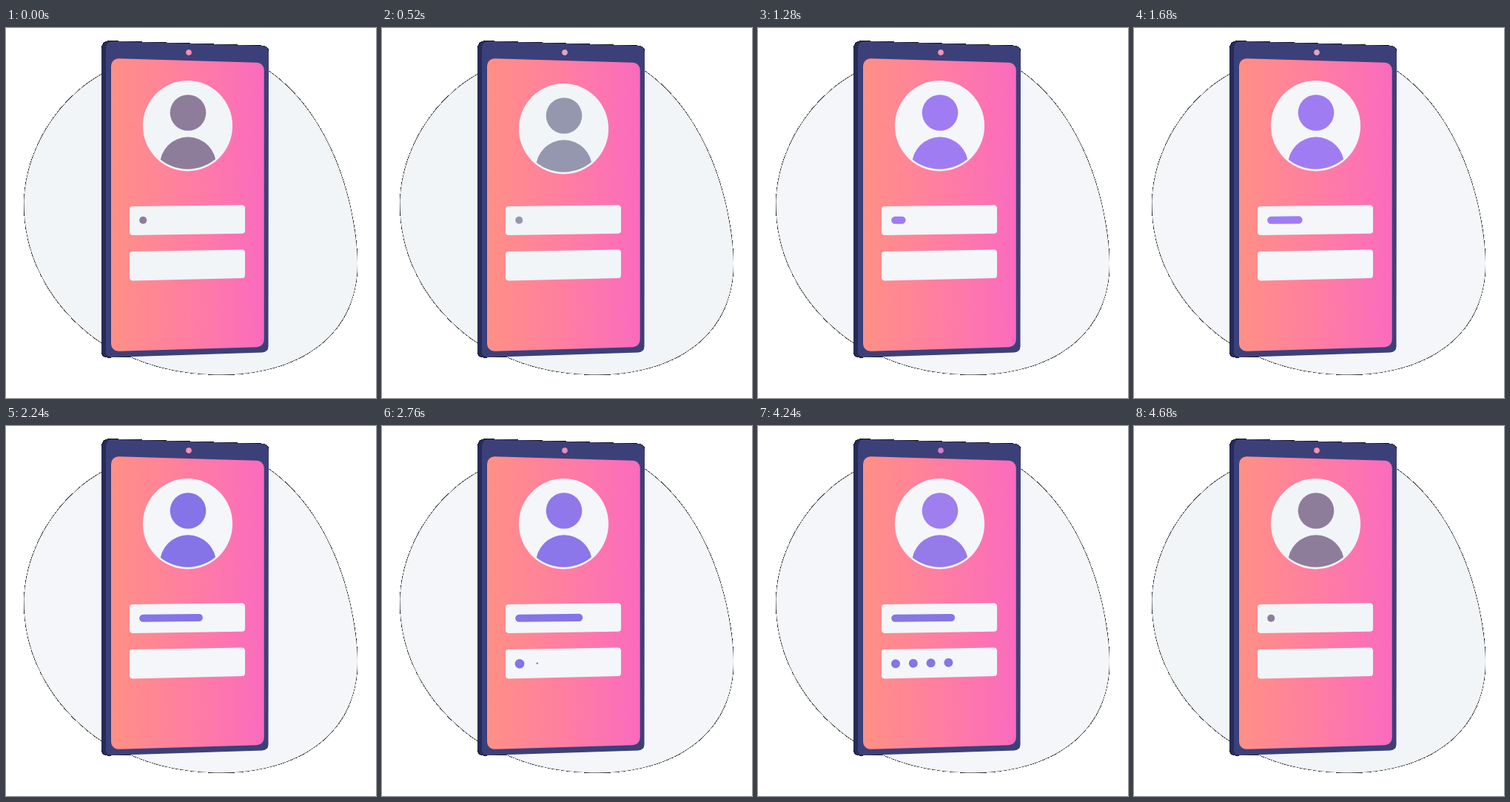
Write an HTML page with a canvas that moves like this. It is 500 by 500 pixels and loops after 4.84 s.

```html
<!DOCTYPE html>
<html lang="en">
<head>
<meta charset="utf-8">
<title>Sign-in phone</title>
<style>
html, body { margin: 0; width: 100%; height: 100%; overflow: hidden; background: #fff; }
canvas { display: block; width: 500px; height: 500px; }
</style>
</head>
<body>
<canvas id="stage" width="500" height="500"></canvas>
<script>
const ctx = document.getElementById('stage').getContext('2d', { willReadFrequently: true });
const LOOP = 4840, STEP = 40;

const blob = new Path2D('M24.5 240 C24.5 170 66 98 130 62 C200 20 300 20 355 58 C410 96 448 165 465 240 C471 268 475 295 475 318 C475 420 390 468.5 292 468.5 C240 468.5 200 458 170 445 C155 439 142 433 130 426 C64 382 24.5 312 24.5 240Z');
const side = new Path2D('M129 28 Q130 17.5 140 17.5 L150 18 L150 444.5 L138 445.3 Q129 445 129 436Z');
const front = new Path2D('M135 28 Q135.5 17.6 145 17.8 L346 24 Q355 24.5 355 33 L354.5 430 Q354.5 438 346 438.5 L144 445 Q135 445.5 135 437Z');

const screenFill = ctx.createLinearGradient(142, 0, 349, 0);
screenFill.addColorStop(0, '#ff9085');
screenFill.addColorStop(0.5, '#ff7ea1');
screenFill.addColorStop(1, '#fa6bbe');

const MAUVE = [142, 124, 155], SLATE = [149, 151, 174];
const VIOLET = [160, 124, 242], INDIGO = [132, 116, 231];
const MIST = [241, 245, 248], SNOW = [244, 246, 250];
const PINK = [255, 143, 179], PALE = [226, 168, 193], ORCHID = [214, 122, 207];

const clamp = v => Math.max(0, Math.min(1, v));
const ease = (t, from, to) => {
  const p = clamp((t - from) / (to - from));
  return p * p * (3 - 2 * p);
};
const mix = (a, b, p) => a.map((v, i) => v + (b[i] - v) * p);
const css = c => `rgb(${c.map(Math.round)})`;

function palette(t, shown) {
  const awake = ease(t, 520, 880) * shown;
  const settled = ease(t, 2240, 3400);
  const dull = mix(MAUVE, SLATE, ease(t, 0, 520) * shown);
  const vivid = mix(VIOLET, INDIGO, ease(t, 1680, 2240));
  const tint = p => css(mix(dull, mix(vivid, VIOLET, settled * p), awake));
  const glow = mix(PINK, PALE, Math.sin(Math.PI * t / 1120) ** 2 * (1 - settled));
  return {
    ink: tint(0), body: tint(0.6), head: tint(1),
    paper: css(mix(MIST, SNOW, awake)),
    lens: css(mix(glow, ORCHID, settled * shown))
  };
}

function fill(path, color) {
  ctx.fillStyle = color;
  ctx.fill(path);
}

function disc(x, y, rx, color, ry = rx) {
  const p = new Path2D();
  p.ellipse(x, y, rx, ry, 0, 0, Math.PI * 2);
  fill(p, color);
}

// Rounded panel with slanted top and bottom edges
function panel(x1, x2, tl, tr, br, bl, r, color) {
  const p = new Path2D();
  p.moveTo(x1, (tl + bl) / 2);
  p.arcTo(x1, tl, x2, tr, r);
  p.arcTo(x2, tr, x2, br, r);
  p.arcTo(x2, br, x1, bl, r);
  p.arcTo(x1, bl, x1, tl, r);
  p.closePath();
  fill(p, color);
}

function avatar(t, colors) {
  const down = 4 * ease(t, 0, 520) - 5 * ease(t, 520, 880) + ease(t, 880, 1120);
  ctx.save();
  ctx.translate(0, down);
  disc(245.5, 132.2, 60.6, colors.paper, 61.2);
  disc(246, 114.5, 24.3, colors.head);
  ctx.beginPath();
  ctx.ellipse(245.5, 132.2, 58.2, 58.6, 0, 0, Math.PI * 2);
  ctx.clip();
  disc(246, 185.3, 38, colors.body);
  ctx.restore();
}

function nameBar(length, color) {
  const x = 185.2, y = 259.8;
  ctx.beginPath();
  ctx.moveTo(x, y);
  ctx.lineTo(x + length + 0.01, y - length * 0.011);
  ctx.strokeStyle = color;
  ctx.lineWidth = 10.1;
  ctx.lineCap = 'round';
  ctx.stroke();
}

// Blend soft silhouette pixels with black for a hard, dark rim
function hardenRim() {
  const image = ctx.getImageData(0, 0, 500, 500), px = image.data;
  for (let i = 0; i < px.length; i += 4) {
    const alpha = px[i + 3];
    if (alpha === 0 || alpha === 255) continue;
    for (let c = 0; c < 3; c++) px[i + c] *= alpha / 255;
    px[i + 3] = 255;
  }
  ctx.putImageData(image, 0, 0);
}

function draw(t) {
  const shown = 1 - ease(t, 4160, 4680);
  const colors = palette(t, shown);

  ctx.clearRect(0, 0, 500, 500);
  fill(blob, colors.paper);
  fill(side, '#272b58');
  fill(front, '#3c4079');
  disc(247, 33.1, 3.8, colors.lens);
  panel(142, 348.7, 41, 47, 431, 437, 10, screenFill);

  avatar(t, colors);
  panel(167, 323, 241, 239.3, 277.6, 280, 4, colors.paper);
  panel(167, 323, 302.1, 299.4, 337.8, 341.6, 4, colors.paper);
  nameBar(81 * ease(t, 960, 2480) * shown, colors.ink);

  for (let i = 0; i < 4; i++) {
    const start = 2480 + i * 200;
    disc(186 + i * 23.8, 321.3 - i * 0.5, 6.4 * ease(t, start, start + 280) * shown, colors.ink);
  }
  hardenRim();
}

let last = -1;
function frame() {
  const step = Math.floor(performance.now() % LOOP / STEP) * STEP;
  const t = step >= 3400 && step < 4200 ? 3400 : step;
  if (t !== last) draw(last = t);
  requestAnimationFrame(frame);
}
frame();
</script>
</body>
</html>
```
